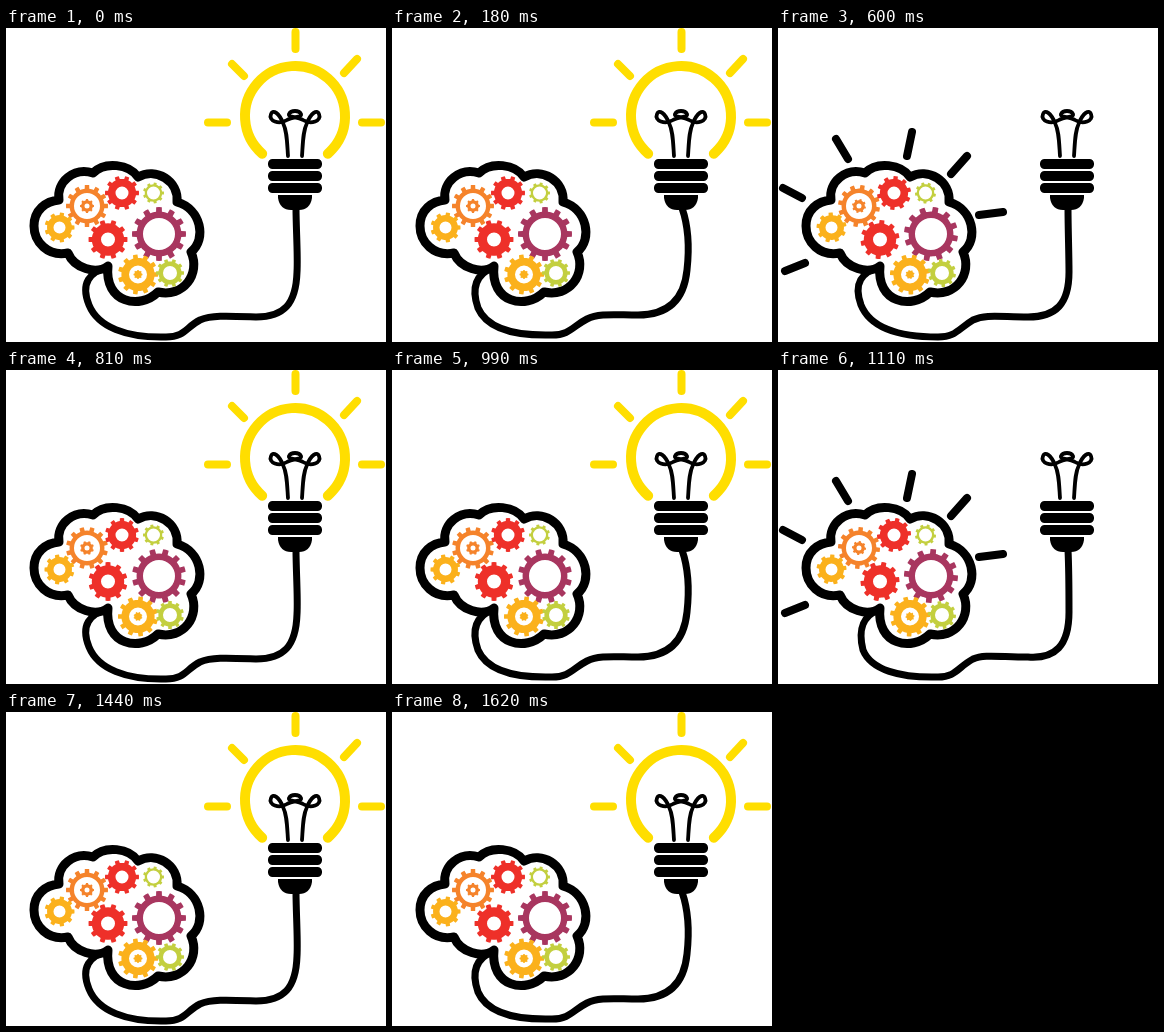
Recreate the animation shown at these times as an HTML page with a canvas. Size 380x314 px, loop 1650 ms.

```html
<!DOCTYPE html>
<html lang="en">
<head>
<meta charset="utf-8">
<title>Brain and bulb</title>
<style>
html, body { margin: 0; width: 100%; height: 100%; overflow: hidden; background: #fff; }
canvas { display: block; }
</style>
</head>
<body>
<canvas id="stage" width="380" height="314"></canvas>
<script>
const ctx = document.getElementById('stage').getContext('2d');
const LOOP = 1650, STEP = 30, POSE = 180;
const BLACK = '#000', YELLOW = '#ffde00', ORANGE = '#f5832b', RED = '#ee3029';
const AMBER = '#fbb11c', LIME = '#c3cf3f', PLUM = '#a8365f';

const brain = new Path2D(`M62 225C42 229 28 214 28 198C28 182 40 173 53 172
  C50 154 68 139 87 145C99 133 123 136 132 149C150 139 173 153 171 174
  C195 181 201 211 185 224C195 246 177 270 152 264C134 282 98 275 102 238
  C90 247 68 240 62 225Z`);

// One wire shape per pose; the wire sways through all four.
const wires = [
  `M290 180C290 200 292 228 291 244C290 276 278 289 250 289C222 288 206 287 194 292
   C180 299 179 309 160 309C120 310 92 299 83 277C74 255 84 244 102 239`,
  `M290 180C297 200 297 224 295 242C292 273 275 287 246 287C222 287 207 285 195 291
   C181 298 178 307 160 307C122 308 95 301 86 280C79 260 84 246 102 239`,
  `M290 180C291 200 291 224 291 242C291 276 277 289 250 287C222 287 206 284 195 289
   C180 297 178 307 160 307C122 308 93 300 85 280C80 260 84 246 102 239`,
  `M290 180C290 200 291 226 291 244C291 276 278 289 250 289C222 289 208 286 195 292
   C180 301 178 309 160 309C120 309 92 299 83 277C75 255 84 244 102 239`
].map(d => new Path2D(d));

const filament = new Path2D(`M282 128C281 113 281 103 277 95C273 85 267 81 265 86
  C262 93 273 97 281 92C287 88 296 90 295 86C293 82 285 82 283 86
  C282 90 291 88 297 92C305 97 316 93 313 86C311 81 305 85 301 95C297 103 297 113 296 128`);
const cap = new Path2D('M272 167H306V170Q304 182 293 182H285Q274 182 272 170Z');
const glass = new Path2D();
glass.arc(289, 88, 50, Math.PI * 0.728, Math.PI * 2.272);

const bulbRays = new Path2D('M289.500 4V21M338 45L351 31M226 36L238 48M202 94.500H221M356 94.500H375');
const brainRays = new Path2D(`M58 111L70 131M134 104L129 128M189 128L173 146
  M201 187L225 184M5 160L24 170M7 243L27 235`);

// x, y, outer radius, hole radius, teeth, colour, direction
const gears = [
  [81, 178, 21, 13, 12, ORANGE, 1],
  [81, 178, 7, 2.5, 8, ORANGE, 1],
  [116, 165, 17, 6.5, 10, RED, -1],
  [147.5, 165, 10.5, 6.5, 9, LIME, 1],
  [53.5, 199.5, 15, 6, 9, AMBER, -1],
  [102, 211.5, 19.5, 7, 10, RED, -1],
  [153, 206, 27, 16, 12, PLUM, 1],
  [132, 246.5, 20, 9, 11, AMBER, -1],
  [132, 246.5, 4.5, 0, 8, AMBER, -1],
  [164, 245, 14, 7, 10, LIME, 1]
];

function stroke(path, width, color = BLACK) {
  ctx.lineWidth = width;
  ctx.strokeStyle = color;
  ctx.stroke(path);
}

function drawGear([x, y, outer, hole, teeth, color, direction], turn) {
  const pitch = 2 * Math.PI / teeth, root = outer * 0.83;
  ctx.beginPath();
  for (let i = 0; i < teeth; i++) {
    const a = (i + direction * turn) * pitch;
    ctx.arc(x, y, root, a - pitch * 0.5, a - pitch * 0.25);
    ctx.arc(x, y, outer, a - pitch * 0.2, a + pitch * 0.2);
    ctx.arc(x, y, root, a + pitch * 0.25, a + pitch * 0.5);
  }
  ctx.closePath();
  ctx.moveTo(x + hole, y);
  ctx.arc(x, y, hole, 0, 2 * Math.PI);
  ctx.fillStyle = color;
  ctx.fill('evenodd');
}

function draw(time) {
  const t = Math.floor(time % LOOP / STEP) * STEP;
  const pose = Math.floor(t / POSE) % 4;
  ctx.fillStyle = '#fff';
  ctx.fillRect(0, 0, 380, 314);
  ctx.lineCap = ctx.lineJoin = 'round';

  stroke(wires[pose], 7);
  stroke(brain, 9);
  gears.forEach(gear => drawGear(gear, t / POSE));

  if (pose < 2) {
    stroke(glass, 10, YELLOW);
    stroke(bulbRays, 8, YELLOW);
  } else {
    stroke(brainRays, 8);
  }

  stroke(filament, 3.8);
  ctx.fillStyle = BLACK;
  ctx.fill(cap);
  ctx.beginPath();
  for (const y of [131, 143, 155]) ctx.roundRect(262, y, 54, 10, 4.5);
  ctx.fill();
}

const start = performance.now();
function tick() {
  draw(performance.now() - start);
  requestAnimationFrame(tick);
}
tick();
</script>
</body>
</html>
```
